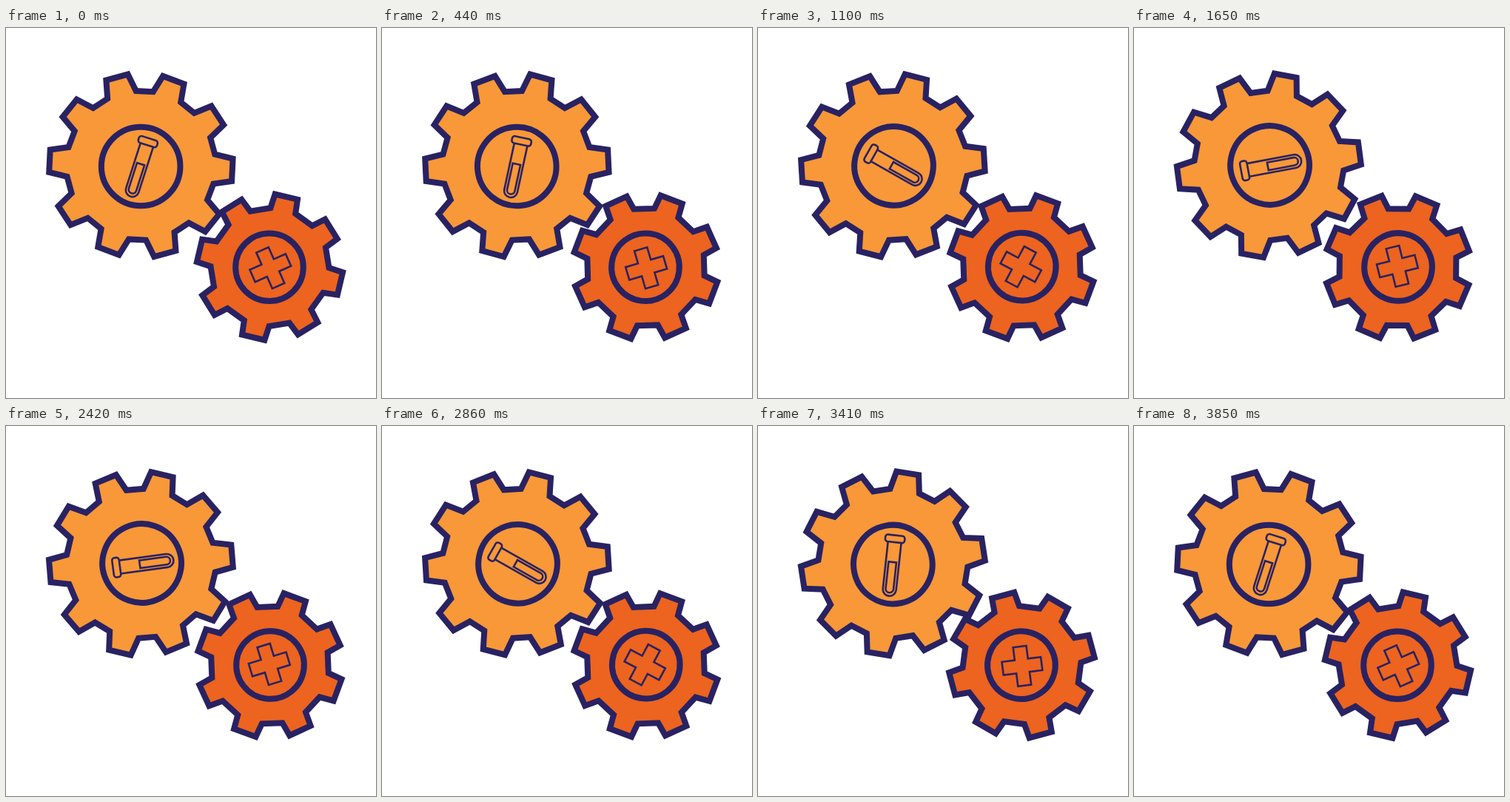
Animation of 500x500 px, one loop 3.96 s. Source, as an HTML page:

```html
<!DOCTYPE html>
<html lang="en">
<head>
<meta charset="utf-8">
<title>Turning gears</title>
<style>
  html, body { margin: 0; width: 100%; height: 100%; overflow: hidden; background: #fff; }
  svg { display: block; width: 100%; height: 100%; }
  svg * { stroke: #292262; }
  .bold { stroke-width: 8; }
  .thin { stroke-width: 2.6; fill: none; }
</style>
</head>
<body>
<svg viewBox="0 0 500 500">
  <g id="big" fill="#f89838">
    <path class="bold"/>
    <circle class="bold" cx="-.25" cy="1.2" r="53.3"/>
    <g class="thin" transform="translate(-.25 1.2) rotate(17.8) translate(-1 0)">
      <rect x="-13.2" y="-39.5" width="26.4" height="9.5" rx="3.5"/>
      <path d="M-9 -30V34A9 9 0 0 0 9 34V-30"/>
      <path d="M-5.3 -3H5.3V33.2A5.3 5.3 0 0 1 -5.3 33.2Z"/>
    </g>
  </g>
  <g id="small" fill="#ec641f">
    <path class="bold"/>
    <circle class="bold" cx="-.5" cy=".2" r="45.8"/>
    <path class="thin" transform="translate(.8 1.1) rotate(-24)"
      d="M-9 -26.5H9V-9H26.5V9H9V26.5H-9V9H-26.5V-9H-9Z"/>
  </g>
</svg>
<script>
const STEP = 110, STEPS = 36;

// Degrees turned at each step; the second half of the loop runs back.
const gears = [
  { id: 'big', x: 182.4, y: 185.8, teeth: 10, start: -15.2, dir: -1,
    tip: 124.5, tipHalf: 7, root: 101, rootHalf: 11.4,
    turn: [0, 0, 1.2, 1.2, 5.6, 11.6, 20, 32, 47, 63, 78.3, 94, 107, 115.5, 115.5, 118.4] },
  { id: 'small', x: 356.5, y: 323.1, teeth: 8, start: 13.2, dir: 1,
    tip: 98.8, tipHalf: 9.1, root: 80, rootHalf: 12.5,
    turn: [0, 0, 1.5, 1.5, 7.6, 16.8, 33, 57, 87, 117, 142.2, 162, 178, 187, 187, 190] }
];

function polar(r, deg) {
  const a = deg * Math.PI / 180;
  return (r * Math.sin(a)).toFixed(2) + ' ' + (-r * Math.cos(a)).toFixed(2);
}

function outline(g) {
  const points = [];
  for (let i = 0; i < g.teeth; i++) {
    const a = g.start + i * 360 / g.teeth;
    points.push(
      polar(g.root, a - g.rootHalf), polar(g.tip, a - g.tipHalf),
      polar(g.tip, a + g.tipHalf), polar(g.root, a + g.rootHalf));
  }
  return 'M' + points.join('L') + 'Z';
}

for (const g of gears) {
  g.el = document.getElementById(g.id);
  g.el.querySelector('path').setAttribute('d', outline(g));
}

function draw(ms) {
  const n = Math.floor(ms / STEP) % STEPS;
  const k = Math.min(n, STEPS - n, 15);
  for (const g of gears) {
    g.el.setAttribute('transform', `translate(${g.x} ${g.y}) rotate(${g.dir * g.turn[k]})`);
  }
}

const begin = performance.now();
function tick() {
  draw(performance.now() - begin);
  requestAnimationFrame(tick);
}
tick();
</script>
</body>
</html>
```
